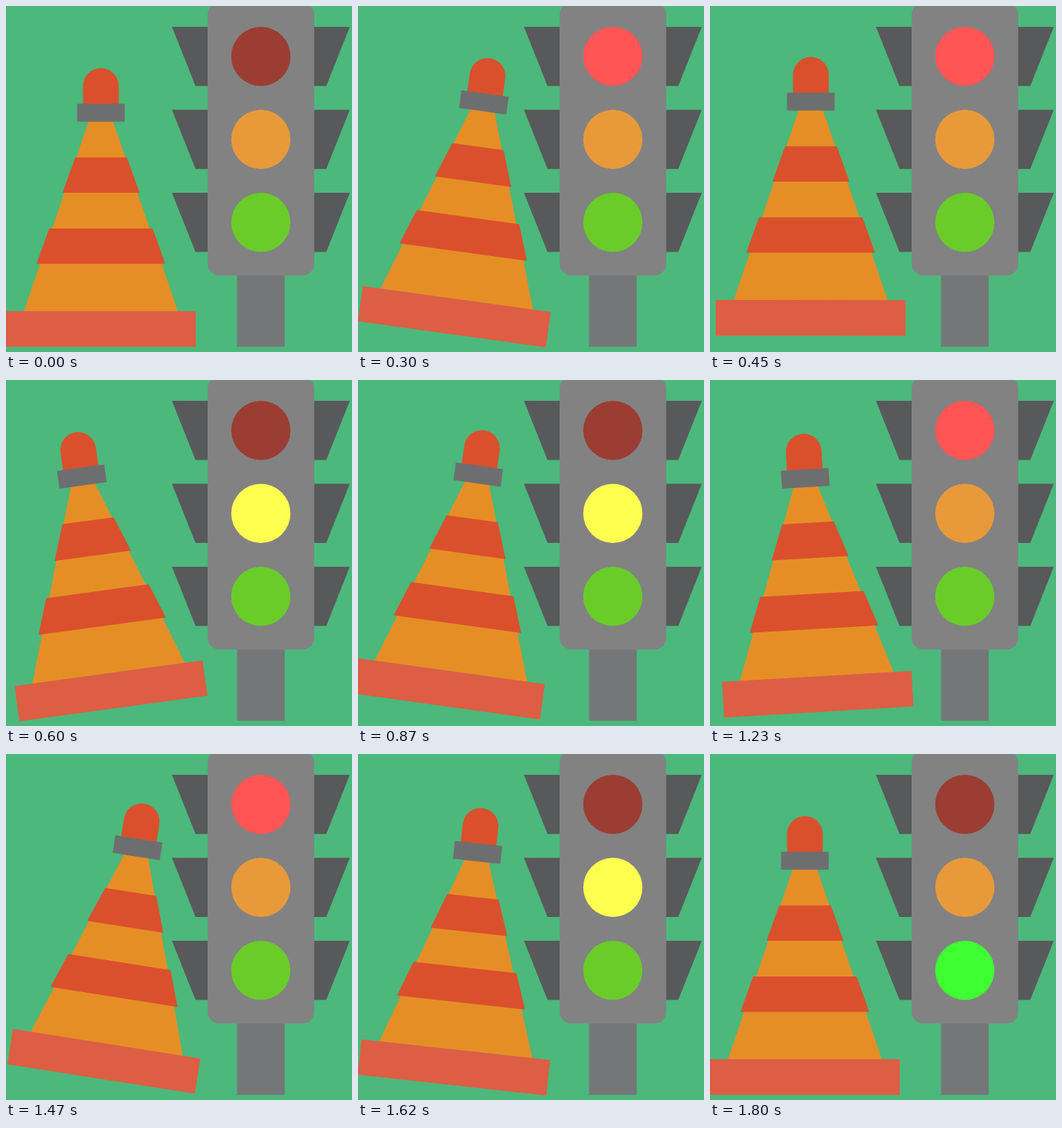
An HTML page for the animation above (2.1 s loop, 465 px wide and 465 px high).

```html
<!DOCTYPE html>
<html lang="en">
<head>
<meta charset="utf-8">
<title>Cone and traffic light</title>
<style>
  html, body { margin: 0; width: 100%; height: 100%; overflow: hidden; background: #4cb87b; }
  svg { display: block; width: 100%; height: 100%; }
</style>
</head>
<body>
<svg viewBox="0 0 465 465">
  <defs>
    <path id="flaps" fill="#58595b" d="M223 28h50v79.5h-18.3zM462 28h-50v79.5h18.4z"/>
  </defs>

  <rect x="310.5" y="350" width="64" height="108" fill="#757678"/>
  <use href="#flaps"/>
  <use href="#flaps" y="111.5"/>
  <use href="#flaps" y="223"/>
  <rect x="271" y="-4.4" width="143.2" height="366.6" rx="16" fill="#828282"/>
  <g id="lamps">
    <circle cx="342.5" cy="67.7" r="39.8"/>
    <circle cx="342.5" cy="179.3" r="39.8"/>
    <circle cx="342.5" cy="290.8" r="39.8"/>
  </g>

  <g id="cone">
    <path fill="#e68e26" d="M111.5 154H143.5L231 410.5H24z"/>
    <path fill="#da502d" d="M93 203.5H162.5L179.5 251H76zM58 299H197L214 346.5H41zM103.5 132V107.5a24 24 0 0 1 48 0V132z"/>
    <rect x="95.5" y="131.5" width="64" height="24" fill="#6d6e70"/>
    <rect y="410.2" width="255" height="47.9" fill="#dd5e45"/>
  </g>
</svg>
<script>
  const LOOP = 2100, STEP = 30, BEAT = 300;
  const cone = document.getElementById('cone');
  const lamps = [...document.getElementById('lamps').children];
  const dim = ['#9b3d33', '#e89a3a', '#6acc29'];
  const lit = ['#ff5555', '#ffff50', '#3fff32'];

  // Cone pose at each beat: x shift, y shift, tilt in degrees
  const poses = [
    [0, 0, 0],
    [24.2, -15.1, 7.85],
    [-8.4, -14.9, -7.75],
    [19.3, -17.9, 9.67],
    [5.2, -10.6, -4.86],
    [32.1, -20, 10.49],
    [0, 0, 0],
    [0, 0, 0]
  ];

  function draw(now) {
    const t = Math.floor(now % LOOP / STEP) * STEP;
    const beat = Math.floor(t / BEAT);
    const part = t % BEAT / BEAT;
    const [x, y, tilt] = poses[beat].map((v, i) => v + (poses[beat + 1][i] - v) * part);
    cone.setAttribute('transform', `translate(${x} ${y}) rotate(${tilt} 127.5 271)`);

    // All lamps stay dim on the first beat, then red, amber, green in turn
    const on = beat ? (beat - 1) % 3 : -1;
    lamps.forEach((lamp, i) => lamp.setAttribute('fill', (i === on ? lit : dim)[i]));
  }

  const start = performance.now();
  function tick() {
    draw(performance.now() - start);
    requestAnimationFrame(tick);
  }
  tick();
</script>
</body>
</html>
```
